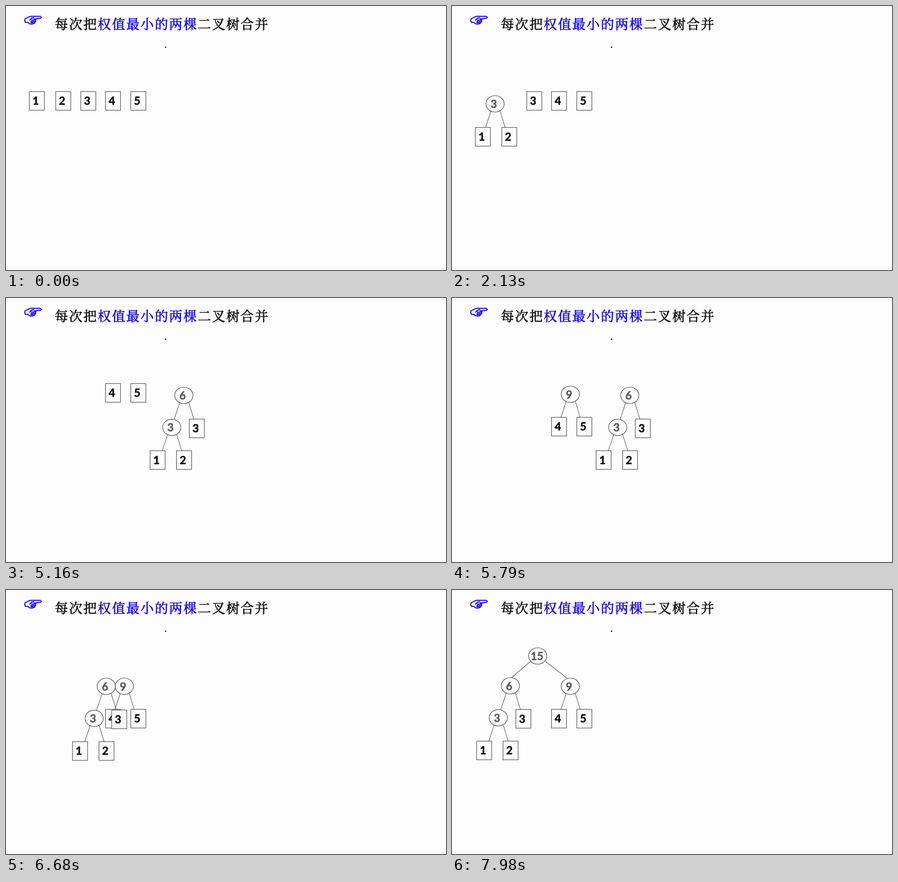
These frames come from a looping animation (965x580 px, 8020 ms). An HTML page:

```html
<!DOCTYPE html>
<html lang="zh-CN">
<head>
<meta charset="utf-8">
<title>Huffman merge</title>
<style>
  html, body { margin: 0; width: 100%; height: 100%; overflow: hidden; background: #fdfdfd; }
  svg { display: block; width: 965px; height: 580px; }
  .title { font: 400 29px "Noto Serif CJK SC", "Noto Sans CJK SC", "Noto Sans CJK", serif; letter-spacing: 2.35px; fill: #1a1a1a; stroke: #1a1a1a; stroke-width: 0.9; }
  .title tspan { fill: #2015dc; stroke: #2015dc; }
  .hand { fill: none; stroke: #2015dc; stroke-width: 2.4; stroke-linecap: round; stroke-linejoin: round; }
  #stage { font: 700 24px Lato, sans-serif; text-anchor: middle; }
  #stage rect, #stage ellipse { fill: #fdfdfd; stroke: #444; stroke-width: 1.2; }
  #stage path { fill: none; stroke: #4c4c4c; stroke-width: 1.1; }
  #stage text { stroke-width: 0.7; }
  .leaf { fill: #101010; stroke: #101010; }
  .sum { fill: #5c5c5c; stroke: #5c5c5c; }
</style>
</head>
<body>
<svg viewBox="0 0 965 580">
  <defs><clipPath id="wipe"><rect id="slot" x="0" width="965" height="400"/></clipPath></defs>
  <g class="hand">
    <path d="M48 25 L41.5 28.5 Q40.5 32.5 42.5 36 L48 36 Q51 39.8 56 39.8 Q62 39.6 63 36.500 Q66 34 65 31 L66 28"/>
    <path d="M48 25 Q52 22.300 58 22.600 L75 22.800 Q79.500 24.500 75.500 27 L62 28.500"/>
    <path d="M61 25.500 Q55 26.500 52 31 M65 30.800 L56 31 M63.500 34 L55 34 M61 37 L54.500 36.500"/>
  </g>
  <text class="title" x="107" y="50.500">每次把<tspan>权值最小的两棵</tspan>二叉树合并</text>
  <circle cx="350" cy="90.500" r="1.8" fill="#333"/>
  <g id="stage"></g>
</svg>
<script>
const LOOP = 8020, STEP = 37.5;
const T = { join3: 310, join6: 3730, right: 5010, drop: 5270, join9: 5420, left: 6410, join15: 7870 };
const stage = document.getElementById('stage');
const slot = document.getElementById('slot');

const clamp = v => Math.max(0, Math.min(1, v));
const mix = (a, b, p) => a + (b - a) * p;
const ease = p => p < 0.5 ? 2 * p * p : 1 - 2 * (1 - p) ** 2;
const ticks = (t, start) => Math.floor((t - start + 4) / STEP);
const glide = (t, start, lead, count) =>
  t < start ? 0 : ease(clamp((ticks(t, start) + lead) / count));

const leaf = (n, x, y) =>
  `<rect x="${x - 16.5}" y="${y - 20.5}" width="33" height="41"/>` +
  `<text class="leaf" x="${x - 2.6}" y="${y + 8.7}">${n}</text>`;

// Parent node with its two branches, given as end points relative to the centre
const FORK = 'M-9 16L-21 52M11 16L22 52';
const parent = (n, x, y, branches = FORK) =>
  `<path transform="translate(${x} ${y})" d="${branches}"/>` +
  `<ellipse cx="${x}" cy="${y}" rx="20" ry="18"/>` +
  `<text class="sum" x="${x - (n > 9 ? 1.5 : 2.7)}" y="${y + 9}">${n}</text>`;

// Reveals a new parent upwards from the foot of its branches
function reveal(t, start, y, markup) {
  if (t < start) return '';
  const p = 0.2 + 0.31 * ticks(t, start);
  if (p >= 1) return markup;
  slot.setAttribute('y', y + 52 - 70.5 * p);
  return `<g clip-path="url(#wipe)">${markup}</g>`;
}

function firstRow(t) {
  const y = t < T.join3 ? 208.5 : 287.3;
  return reveal(t, T.join3, 215, parent(3, 94.5, 215)) +
    leaf(1, 67.7, y) + leaf(2, 125.6, y) + leaf(3, 180.5, 208.5);
}

function sixTree(t) {
  const out = glide(t, T.right, 1, 5), back = glide(t, T.left, 1.08, 13.9);
  const dx = mix(-243, 0, out) - 262 * back;
  const dy = mix(-9, 0, out) - 3.5 * back;
  return `<g transform="translate(${dx} ${dy})">` +
    reveal(t, T.join6, 214, parent(6, 390, 214)) +
    parent(3, 363.5, 284.3) + leaf(3, 418.5, 286.5) +
    leaf(1, 332.5, 356) + leaf(2, 390.5, 356) + '</g>';
}

function nineTree(t) {
  const y = mix(208.5, 282.7, glide(t, T.drop, 1, 4));
  return reveal(t, T.join9, 211.5, parent(9, 259.5, 211.5)) +
    leaf(4, 234.7, y) + leaf(5, 290.2, y);
}

let last = '';
function draw(t) {
  const root = parent(15, 188, 145, 'M-16 12L-59 49M17 12L66 50');
  const markup = reveal(t, T.join15, 145, root) + nineTree(t) +
    (t < T.join6 ? firstRow(t) : sixTree(t));
  if (markup !== last) stage.innerHTML = last = markup;
}

function tick() {
  draw(performance.now() % LOOP);
  requestAnimationFrame(tick);
}
tick();
</script>
</body>
</html>
```
